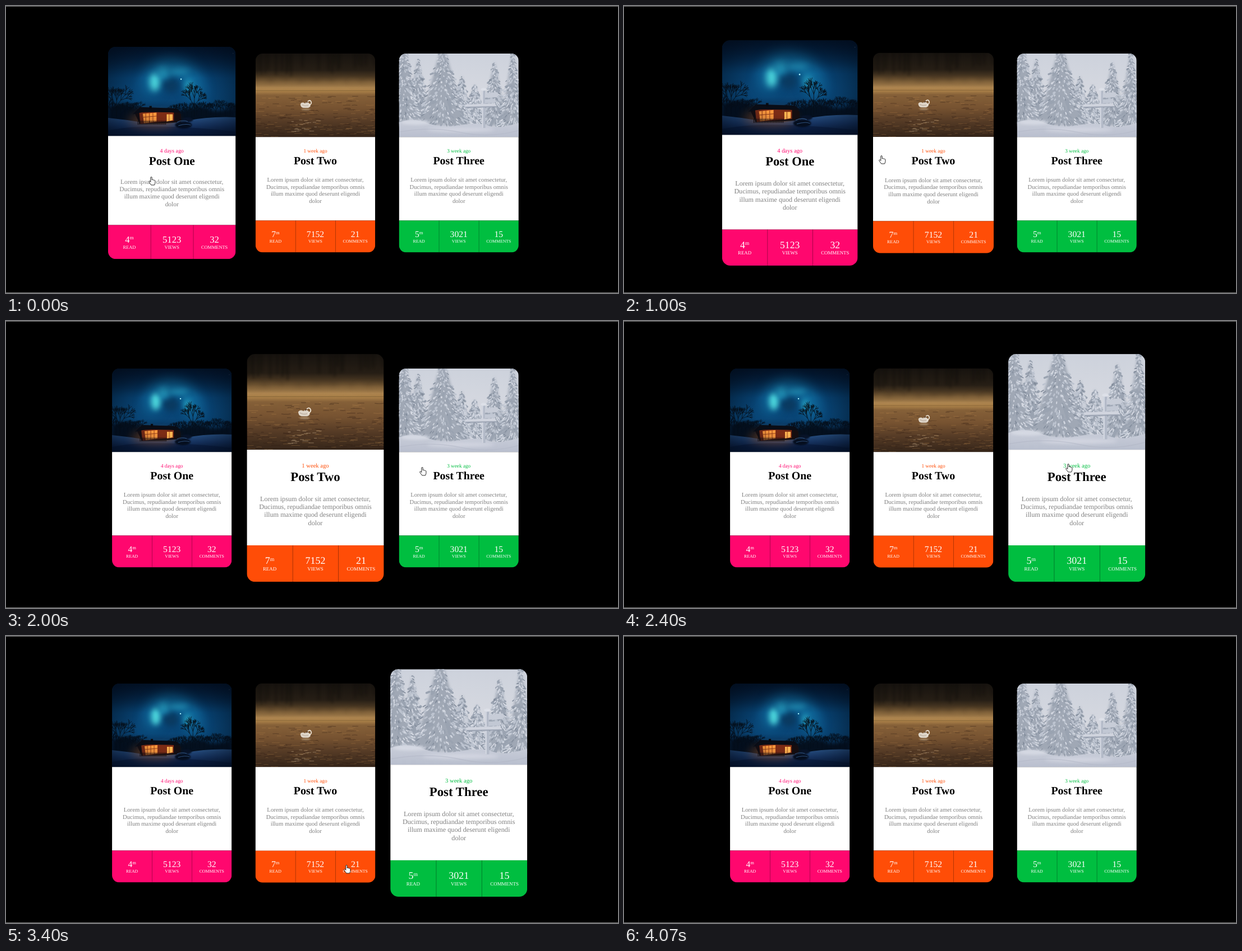
Animation, 1091 px wide and 513 px high, one loop 5.07 s. Source, as an HTML page:

```html
<!DOCTYPE html>
<html lang="en">
<head>
<meta charset="utf-8">
<title>Post cards</title>
<style>
html, body { margin: 0; width: 100%; height: 100%; overflow: hidden; background: #000; }
svg { display: block; }
text { font-family: "Liberation Serif", "Times New Roman", serif; text-anchor: middle; text-rendering: geometricPrecision; }
.date { font-size: 9.25px; }
.title { font-size: 19.9px; font-weight: bold; }
.body { font-size: 10.67px; fill: #808080; }
.value { font-size: 15.64px; fill: #fff; }
.sup { font-size: 8.5px; }
.type { font-size: 7.82px; fill: #fff; }
.line { fill: none; stroke-linecap: round; }
</style>
</head>
<body>
<svg id="stage" width="1091" height="513" viewBox="0 0 1091 513"></svg>
<script>
const W = 213.3, H = 355.5, PIC = 149.3, BAR = 298.6, TOP = 84.9;

let seed = 7;
const rnd = (a = 0, b = 1) => {
  seed = (seed * 16807) % 2147483647;
  return a + (b - a) * seed / 2147483647;
};
const many = (n, fn) => Array.from({ length: n }, (_, i) => fn(i)).join('');
const fix = (...v) => v.map(n => n.toFixed(1)).join(' ');
const line = (d, color, width, more = '') =>
  `<path class="line" d="${d}" stroke="${color}" stroke-width="${width}" ${more}/>`;
const shape = (d, fill, more = '') => `<path d="${d}" fill="${fill}" ${more}/>`;
const oval = (x, y, rx, ry, fill, blur = 0, more = '') =>
  `<ellipse cx="${x}" cy="${y}" rx="${rx}" ry="${ry}" fill="${fill}" ${more}
    ${blur ? `style="filter:blur(${blur}px)"` : ''}/>`;
const box = (x, y, w, h, fill) => `<rect x="${x}" y="${y}" width="${w}" height="${h}" fill="${fill}"/>`;
const stops = list => list.map(([o, c]) => `<stop offset="${o}" stop-color="${c}"/>`).join('');
const fade = (id, ...list) =>
  `<linearGradient id="${id}" x1="0" y1="0" x2="0" y2="1">${stops(list)}</linearGradient>`;

// bare tree as one path
function branch(x, y, angle, len, depth) {
  const x2 = x + Math.cos(angle) * len, y2 = y + Math.sin(angle) * len;
  let d = `M${fix(x, y)}L${fix(x2, y2)}`;
  if (depth) for (const turn of [-0.45, 0.05, 0.5])
    d += branch(x2, y2, angle + turn + rnd(-.2, .2), len * rnd(.6, .85), depth - 1);
  return d;
}
const bare = (x, y, len, depth) => branch(x, y, -Math.PI / 2, len, depth);

function night() {
  const woods = many(22, i => bare(i < 8 ? i * 7 : 108 + (i - 8) * 8, rnd(112, 120), rnd(6, 10), 3));
  return box(0, 0, W, PIC, 'url(#night)') +
    line('M72 66Q76 26 108 30T146 74', '#1580b4', 30, 'opacity=".65" style="filter:blur(10px)"') +
    oval(105, 64, 13, 12, '#0a3b62', 5) +
    oval(78, 59, 8, 15, '#4fdbe0', 5) +
    oval(92, 43, 10, 10, '#259cc0', 6) +
    oval(118, 41, 17, 5, '#2294bd', 5) +
    oval(134, 65, 6, 11, '#249dbd', 5) +
    oval(122, 54, 1.2, 1.2, '#a9f4ff') + oval(209, 11, .7, .7, '#8ab4d4') +
    box(0, 0, W, PIC, 'url(#dusk)') +
    shape('M0 100Q30 92 55 104T120 106T170 104T214 100V128H0z', '#04101f', 'style="filter:blur(3px)"') +
    line(woods, '#06101b', .6) + line(bare(14, 116, 16, 4) + bare(144, 116, 17, 4), '#070f17', .7) +
    shape('M0 119Q30 122 60 127T130 124T214 118V149.3H0z', 'url(#snow)') +
    shape('M0 140Q70 126 214 142V149.3H0z', '#0b1f47', 'opacity=".7"') +
    oval(75, 124, 42, 12, '#d2702d', 8, 'opacity=".45"') +
    shape('M44 110L52 102L113 103L122 113V126L53 129z', '#150d10') +
    shape('M52 110L96 108L110 110V124L54 129z', '#7d2c15') +
    shape('M58 112L81 110V125L60 128z', '#ff9a3e') + shape('M98 113L108 113V123L98 125z', '#ffb552') +
    line('M63 111V128M69 111V127M75 111V126M58 118L81 116M102 113V124', '#8d3715', .9) +
    shape('M41 113L54 101L114 103L123 110L60 109z', '#0a0d16') +
    box(69, 99, 4, 5, '#080a10') +
    line(many(22, i => `M${50 + i * 2.2} 124v6`), '#160d0d', 1) +
    oval(126, 131, 14, 6, '#060f20', 1) + oval(133, 122, 9, 4, '#08142a', 1) +
    line('M116 126Q124 122 133 125M118 132Q130 128 138 131', '#365d8e', 1) +
    box(0, 0, W, PIC, 'url(#edge)');
}

function lake() {
  const ripple = () => many(110, () => {
    const y = 74 + 75 * rnd() ** .8, l = rnd(3, 15);
    return `M${fix(rnd(-5, W), y)}q${fix(l / 2, rnd(-1.2, 1.2), l, 0)}`;
  });
  return box(0, 0, W, PIC, 'url(#lake)') +
    line(many(26, () => `M${fix(rnd(0, W), 0)}v${fix(rnd(15, 40))}`), '#0c0b08', 3,
      'opacity=".35" style="filter:blur(2px)"') +
    many(9, i => oval(i * 27, rnd(47, 53), 22, rnd(2, 5), '#a07a48', 5, 'opacity=".4"')) +
    box(0, 66, W, .8, '#59402580') +
    line(ripple(), '#d49a58', .8, 'opacity=".28"') + line(ripple(), '#2a1a10', 1, 'opacity=".38"') +
    line(many(20, () => `M${fix(rnd(64, 112), rnd(119, 140))}h${fix(rnd(3, 9))}`), '#dfc39b', .8, 'opacity=".5"') +
    oval(90, 100, 8, 2, '#c8b190', 1, 'opacity=".5"') +
    shape('M80 90Q83 86 88 89Q92 85 97 90Q100 95 94 97H85Q80 96 80 90z', '#ded5c8') +
    line('M95 93Q101 90 99 86Q97 82 93 86', '#efe6d8', 1.6) +
    line('M93 86L91 88', '#3a2418', 1) + line('M83 92Q88 95 94 93', '#a9998a', .8);
}

function fir(x, top, base, half) {
  const tuft = (n, size) => many(n, () => {
    const k = rnd() ** .65, side = rnd(-1, 1), l = size * (.5 + k);
    return `M${fix(x + side * half * k, top + (base - top) * k)}l${fix(side * l, l * rnd(.3, .8))}`;
  });
  return shape(`M${x} ${top}L${x + half * .9} ${base}H${x - half * .9}z`, '#a0a8b5', 'style="filter:blur(2px)"') +
    line(tuft(100, 5), '#9aa3b1', 3.2) + line(tuft(60, 4), '#838d9c', 1.4) +
    line(tuft(110, 4), '#bcc3cf', 2.4) + line(tuft(75, 3), '#d6dae3', 1.6);
}

function winter() {
  return box(0, 0, W, PIC, 'url(#winter)') +
    fir(135, 55, 126, 20) + fir(112, 40, 126, 20) + fir(170, 15, 128, 26) + fir(203, -5, 130, 25) +
    fir(34, 10, 124, 24) + fir(8, -30, 130, 30) + fir(78, -22, 128, 46) +
    shape('M0 123Q25 114 50 124T110 128T160 129T214 124V149.3H0z', 'url(#drift)') +
    oval(30, 123, 26, 4, '#d5d9e3', 2) + oval(110, 136, 60, 4, '#d3d6e1', 3) +
    line('M2 140Q60 130 110 141T212 138', '#b2b8c7', 1.4, 'opacity=".6"') +
    box(148, 64, 6, 69, '#b3bac8') + box(148, 64, 2, 69, '#d5d9e3') +
    shape('M117 91L172 89V95L119 96z', '#d0d4de') + shape('M119 95L172 94V96L119 97z', '#9da5b4') +
    shape('M153 71L175 69L178 73L175 78L153 79z', '#c7ccd7') +
    shape('M153 82L171 81V88L153 89z', '#c2c8d4') +
    oval(118, 80, 4, 5, '#cbd0da', 1) + oval(151, 64, 5, 2.5, '#dde0e8');
}

const text = (cls, x, y, str, fill = '') => `<text class="${cls}" x="${x}" y="${y}" ${fill && `fill="${fill}"`}>${str}</text>`;
const lorem = ['Lorem ipsum dolor sit amet consectetur,', 'Ducimus, repudiandae temporibus omnis',
  'illum maxime quod deserunt eligendi', 'dolor'];

const cards = [
  { x: 189.05, pic: night, date: '4 days ago', title: 'Post One', color: '#ff076e',
    stats: [4, 5123, 32], hovers: [[-133, 945]] },
  { x: 444.85, pic: lake, date: '1 week ago', title: 'Post Two', color: '#ff4d07',
    stats: [7, 7152, 21], hovers: [[965, 1975], [3385, 3620]] },
  { x: 700.55, pic: winter, date: '3 week ago', title: 'Post Three', color: '#00be40',
    stats: [5, 3021, 15], hovers: [[2015, 3372]] }
];

function drawCard({ pic, date, title, color, stats }) {
  const mid = W / 2;
  return `<g class="card"><g clip-path="url(#round)">` +
    `<g clip-path="url(#frame)">${pic()}</g>` +
    box(0, PIC, W, BAR - PIC, '#fff') + box(0, BAR, W, H - BAR, color) +
    text('date', mid, 177.4, date, color) + text('title', mid, 197.9, title, '#000') +
    lorem.map((s, i) => text('body', mid, 229.3 + i * 12.55, s)).join('') +
    stats.map((n, i) => {
      const x = W * (i + .5) / 3;
      return text('value', x, 327.8, i ? n : `${n}<tspan class="sup" dy="-5">m</tspan>`) +
        text('type', x, 338.2, ['READ', 'VIEWS', 'COMMENTS'][i]) +
        (i ? box(W * i / 3, BAR, .75, H - BAR, '#0006') : '');
    }).join('') + '</g></g>';
}

const stage = document.getElementById('stage');
stage.innerHTML = `<defs>
  <clipPath id="round"><rect width="${W}" height="${H}" rx="12.8"/></clipPath>
  <clipPath id="frame"><rect width="${W}" height="${PIC}"/></clipPath>` +
  fade('night', [0, '#042244'], [.3, '#07406f'], [.6, '#0a4a7d'], [.78, '#0c335a'], [1, '#0a1c38']) +
  fade('dusk', [0, '#020d1e90'], [.35, '#020d1e00'], [1, '#020d1e30']) +
  fade('snow', [0, '#2d598f'], [.45, '#1b3d72'], [1, '#0a1c3e']) +
  fade('lake', [0, '#17130f'], [.2, '#261e15'], [.32, '#5a4429'], [.41, '#ad8550'], [.45, '#aa8048'],
    [.5, '#856038'], [.65, '#775331'], [.82, '#543a25'], [1, '#352519']) +
  fade('winter', [0, '#cdd2dc'], [.6, '#d8dae1'], [1, '#c6cad6']) +
  fade('drift', [0, '#ccd0db'], [.4, '#c3c8d5'], [1, '#b9bfce']) +
  `<radialGradient id="edge" r=".72">${stops([[.4, '#010a1800'], [1, '#010a18c0']])}</radialGradient></defs>` +
  box(0, 0, 1091, 513, '#000') + box(0, 0, 1091, 1, '#7d7d7d') + box(0, 512, 1091, 1, '#7d7d7d') +
  cards.map(drawCard).join('') +
  `<path id="hand" fill="#fff" stroke="#111" stroke-width=".9" stroke-linejoin="round"
    d="M-2.2 1.5V-6.2a1.2 1.2 0 0 1 2.4 0V-2a1.2 1.2 0 0 1 2.2.2 1.1 1.1 0 0 1 1.9.5 1 1 0 0 1 1.6.8V3.5L4.6 7H-1.2L-5.2 1.6a1.2 1.2 0 0 1 1.8-1.5z"/>`;

const groups = stage.querySelectorAll('.card'), hand = document.getElementById('hand');

// time, x, y of the pointer
const path = [[0, 260, 313], [400, 293, 305], [667, 293, 305], [733, 296, 304], [867, 350, 290], [933, 405, 283],
  [1000, 460, 275], [1200, 517, 268], [1333, 521, 270], [1467, 522, 270], [1667, 522, 270], [1867, 600, 270],
  [1933, 655, 269], [2000, 743, 269], [2400, 793, 263], [2733, 822, 193], [2867, 822, 180], [3067, 822, 180],
  [3200, 790, 230], [3333, 695, 365], [3400, 608, 417], [3533, 540, 440], [3600, 480, 458], [3667, 268, 496],
  [3900, 268, 496]];

// the CSS "ease" curve
function ease(x) {
  if (x <= 0) return 0;
  if (x >= 1) return 1;
  let lo = 0, hi = 1, u;
  for (let i = 0; i < 24; i++) {
    u = (lo + hi) / 2;
    const at = .75 * u * (1 - u) + u ** 3;
    if (at < x) lo = u; else hi = u;
  }
  return .3 * u * (1 - u) ** 2 + 3 * u * u * (1 - u) + u ** 3;
}

function hover(t, [on, off]) {
  const up = ease((Math.min(t, off) - on) / 500);
  return t > off ? up * (1 - ease((t - off) / (500 * up))) : up;
}

function render(t) {
  cards.forEach((card, i) => {
    const s = 1 + .15 * Math.max(...card.hovers.map(h => hover(t, h)));
    groups[i].setAttribute('transform',
      `translate(${card.x + W / 2 * (1 - s)} ${TOP + H / 2 * (1 - s)}) scale(${s})`);
  });
  const next = path.findIndex(p => p[0] > t);
  hand.style.display = next < 0 ? 'none' : '';
  if (next > 0) {
    const [t0, x0, y0] = path[next - 1], [t1, x1, y1] = path[next], k = (t - t0) / (t1 - t0);
    hand.setAttribute('transform', `translate(${x0 + (x1 - x0) * k} ${y0 + (y1 - y0) * k})`);
  }
}

const start = performance.now();
function tick(now) {
  const t = Math.max(0, now - start) % 5070;
  render(Math.floor(t * .015 + .06) / .015); // 15 pictures a second
  requestAnimationFrame(tick);
}
render(0);
requestAnimationFrame(tick);
</script>
</body>
</html>
```
